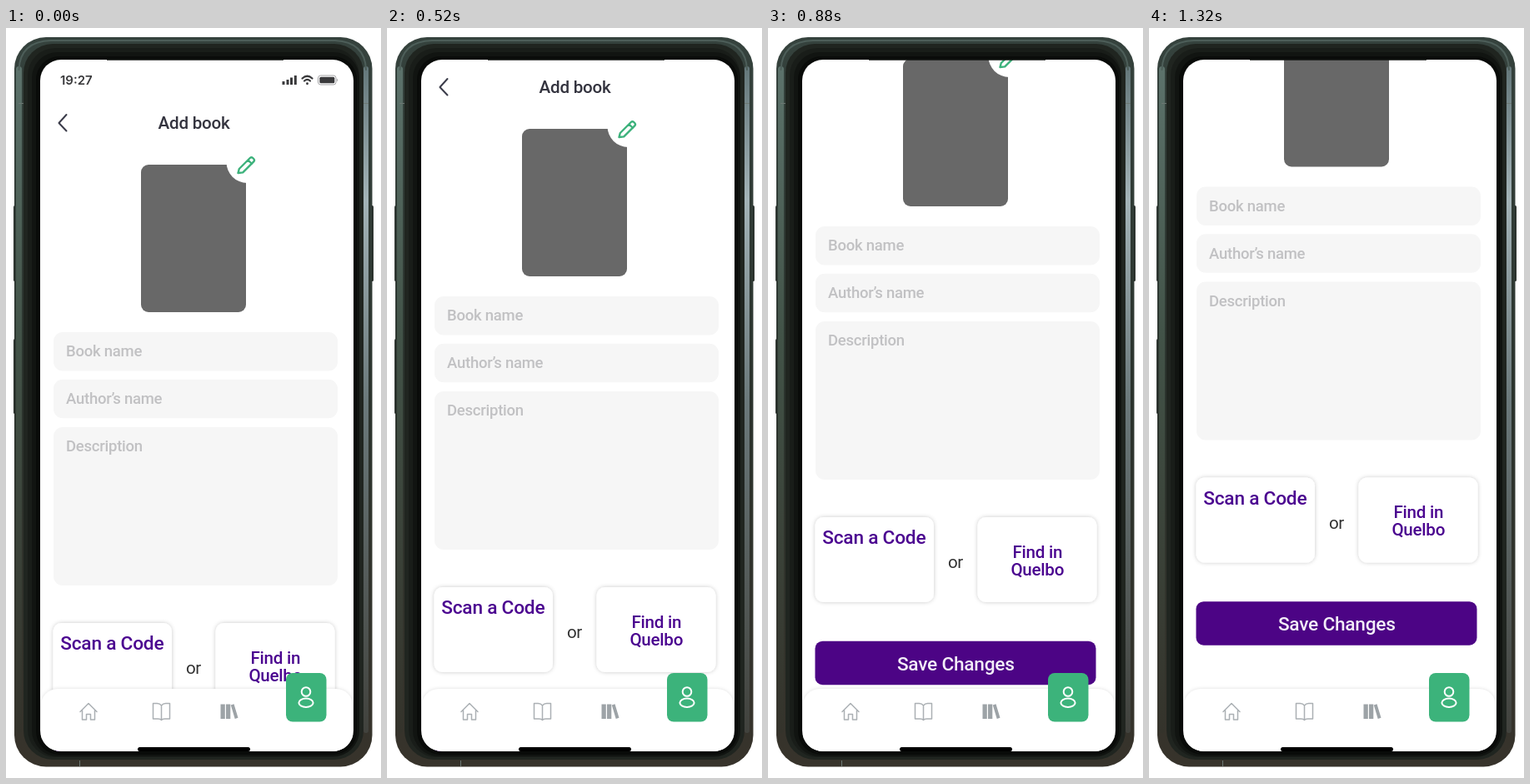
Write an HTML page that moves like this. It is 450x900 px and loops after 1360 ms.

```html
<!DOCTYPE html>
<html lang="en">
<head>
<meta charset="utf-8">
<title>Add book</title>
<style>
  html, body { margin: 0; width: 100%; height: 100%; overflow: hidden; background: #fff; }
  svg { display: block; width: 450px; height: 900px; }
  text { font: 500 20.6px Roboto, sans-serif; letter-spacing: -.25px; }
  .mid { text-anchor: middle; }
  .hint { font-size: 18.5px; fill: #c1c1c3; }
  .big { font-size: 22.7px; }
  .violet { fill: #4b0590; }
  .line { fill: none; stroke-linecap: round; stroke-linejoin: round; }
</style>
</head>
<body>
<svg viewBox="0 0 450 900">
  <defs>
    <linearGradient id="body" x2="0" y2="1">
      <stop stop-color="#35423d"/>
      <stop offset=".5" stop-color="#2b332d"/>
      <stop offset="1" stop-color="#37332b"/>
    </linearGradient>
    <linearGradient id="leftRim" x2="0" y2="1">
      <stop stop-color="#5c726b"/>
      <stop offset=".4" stop-color="#425348"/>
      <stop offset="1" stop-color="#34332b"/>
    </linearGradient>
    <linearGradient id="rightRim" x2="0" y2="1">
      <stop stop-color="#64777a"/>
      <stop offset=".2" stop-color="#a3b3b7"/>
      <stop offset=".5" stop-color="#6b797b"/>
      <stop offset="1" stop-color="#41423d"/>
    </linearGradient>
    <clipPath id="screen"><rect x="41" y="38" width="376" height="830" rx="25"/></clipPath>
    <filter id="soft" x="-20%" y="-20%" width="140%" height="140%">
      <feDropShadow dx="0" dy="0" stdDeviation="2.8" flood-color="#000" flood-opacity=".22"/>
    </filter>
  </defs>

  <!-- phone -->
  <g fill="#2a302c">
    <rect x="9" y="213" width="4" height="91" rx="1.5"/>
    <rect x="9" y="373" width="4" height="90" rx="1.5"/>
    <rect x="437" y="213" width="4" height="91" rx="1.5"/>
  </g>
  <rect x="10" y="11" width="429.5" height="875.5" rx="38" fill="url(#body)"/>
  <rect x="12" y="46" width="7" height="800" rx="3.500" fill="url(#leftRim)"/>
  <rect x="429" y="46" width="6" height="800" rx="3" fill="url(#rightRim)"/>
  <path class="line" d="M15.500 50Q17 16 54 15H395Q431 17 432 50" stroke="#4d5e59" stroke-width="2"/>
  <rect x="21" y="19" width="408" height="859" rx="35" fill="#202520"/>
  <rect x="26" y="24" width="398" height="851" rx="33" fill="#191d19"/>
  <rect x="31" y="29" width="393" height="845" rx="31" fill="#111411"/>
  <rect x="36" y="34" width="385" height="838" rx="28" fill="#090b09"/>
  <path d="M15 90.500h6M429 90.500h6M88.500 879v7" stroke="#6d7873"/>
  <rect x="41" y="38" width="376" height="830" rx="25" fill="#fff"/>

  <g clip-path="url(#screen)">
    <g id="page">
      <g fill="#3a3a3c">
        <text x="65" y="67.700" style="font:600 15px Inter,sans-serif;letter-spacing:0">19:27</text>
        <path d="M331.500 64h3v4h-3zM336.500 62h3v6h-3zM341 59.500h3v8.500h-3zM345.800 57h3v11h-3z"/>
        <g class="line" stroke="#3a3a3c" stroke-width="2.200">
          <path d="M355.500 60.500q6-5.500 12 0M358 63.500q3.500-3.200 7 0"/>
          <path d="M361.500 66.600v.2" stroke-width="2.800"/>
        </g>
        <rect x="374.500" y="57" width="21.500" height="11" rx="3" fill="none" stroke="#a5a5a7"/>
        <rect x="376.300" y="58.800" width="18" height="7.400" rx="1.500"/>
        <path d="M397 60.500q2 2 0 4z" fill="#a5a5a7"/>
      </g>
      <path class="line" d="M72.500 104 63.500 114l9 9.500" stroke="#3b3c4a" stroke-width="2"/>
      <text class="mid" x="225.500" y="121" fill="#34343f">Add book</text>

      <rect x="162" y="164" width="126" height="177" rx="9" fill="#686868"/>
      <circle cx="289.500" cy="161" r="25" fill="#fff"/>
      <path class="line" d="M278.500 174l1.300-5 13-13q1.700-1.700 3.400 0l1 1q1.700 1.700 0 3.400l-13 13zM290.500 158.500l4.500 4.500" stroke="#3db27c" stroke-width="2.400"/>

      <g fill="#f6f6f6">
        <rect x="57" y="365" width="341" height="46.500" rx="11"/>
        <rect x="57" y="421.700" width="341" height="46.500" rx="11"/>
        <rect x="57" y="479" width="341" height="190" rx="11"/>
      </g>
      <text class="hint" x="72" y="394.300">Book name</text>
      <text class="hint" x="72" y="451">Author’s name</text>
      <text class="hint" x="72" y="508">Description</text>

      <g fill="#fff" filter="url(#soft)">
        <rect x="56.500" y="714" width="142.500" height="102" rx="10"/>
        <rect x="251.500" y="714" width="143" height="102" rx="10"/>
      </g>
      <text class="mid big violet" x="127.300" y="746.200">Scan a Code</text>
      <text class="mid" x="225" y="775" fill="#333" style="font-weight:400">or</text>
      <text class="mid violet" x="323.300" y="762.900">Find in</text>
      <text class="mid violet" x="323.300" y="783.900">Quelbo</text>

      <rect x="56.500" y="862.700" width="337" height="52.500" rx="9" fill="#4c0485"/>
      <text class="mid big" x="225.300" y="897.500" fill="#f3edf8">Save Changes</text>
    </g>

    <!-- tab bar -->
    <rect x="42" y="793" width="374" height="100" rx="20" fill="#fff" style="filter:drop-shadow(0 0 2px #0002)"/>
    <g class="line" stroke="#abb0b4" stroke-width="1.500">
      <path d="M89 820.500l10-10 10 10M91.500 818.500v11.500h5v-6.500h5v6.500h5v-11.500"/>
      <path d="M186.500 813q-2-2.500-5-2.500h-5v18.500h6q3 0 4 1.500 1-1.500 4-1.500h6v-18.500h-5q-3 0-5 2.500zv17"/>
    </g>
    <path d="M257.500 811.500h5.300v17.500h-5.300zM264 811.500h5.300v17.500h-5.300zM269.800 812.500l3.700-1.200 5 16.500-3.800 1.300z" fill="#9da3a7"/>
    <rect x="336" y="774" width="48.500" height="58.500" rx="8" fill="#3cb37b"/>
    <g fill="none" stroke="#fff" stroke-width="2">
      <circle cx="360" cy="796.500" r="5.300"/>
      <ellipse cx="360" cy="809.700" rx="8.600" ry="5.200"/>
    </g>
    <rect x="158" y="863" width="135" height="5" rx="2.500"/>
  </g>
  <path d="M121 38h212" stroke="#101311" stroke-width="1.500"/>
</svg>
<script>
  const LOOP = 1360, MAX_SCROLL = 174.5;
  const page = document.getElementById('page');

  // The page scrolls at constant speed in 50 ms ticks, then rests at the bottom.
  function draw() {
    const t = performance.now() % LOOP;
    const scroll = Math.min(MAX_SCROLL, Math.max(0, 10.5 * Math.round(t / 50) - 62));
    page.setAttribute('transform', `translate(0 ${-scroll})`);
    requestAnimationFrame(draw);
  }
  draw();
</script>
</body>
</html>
```
